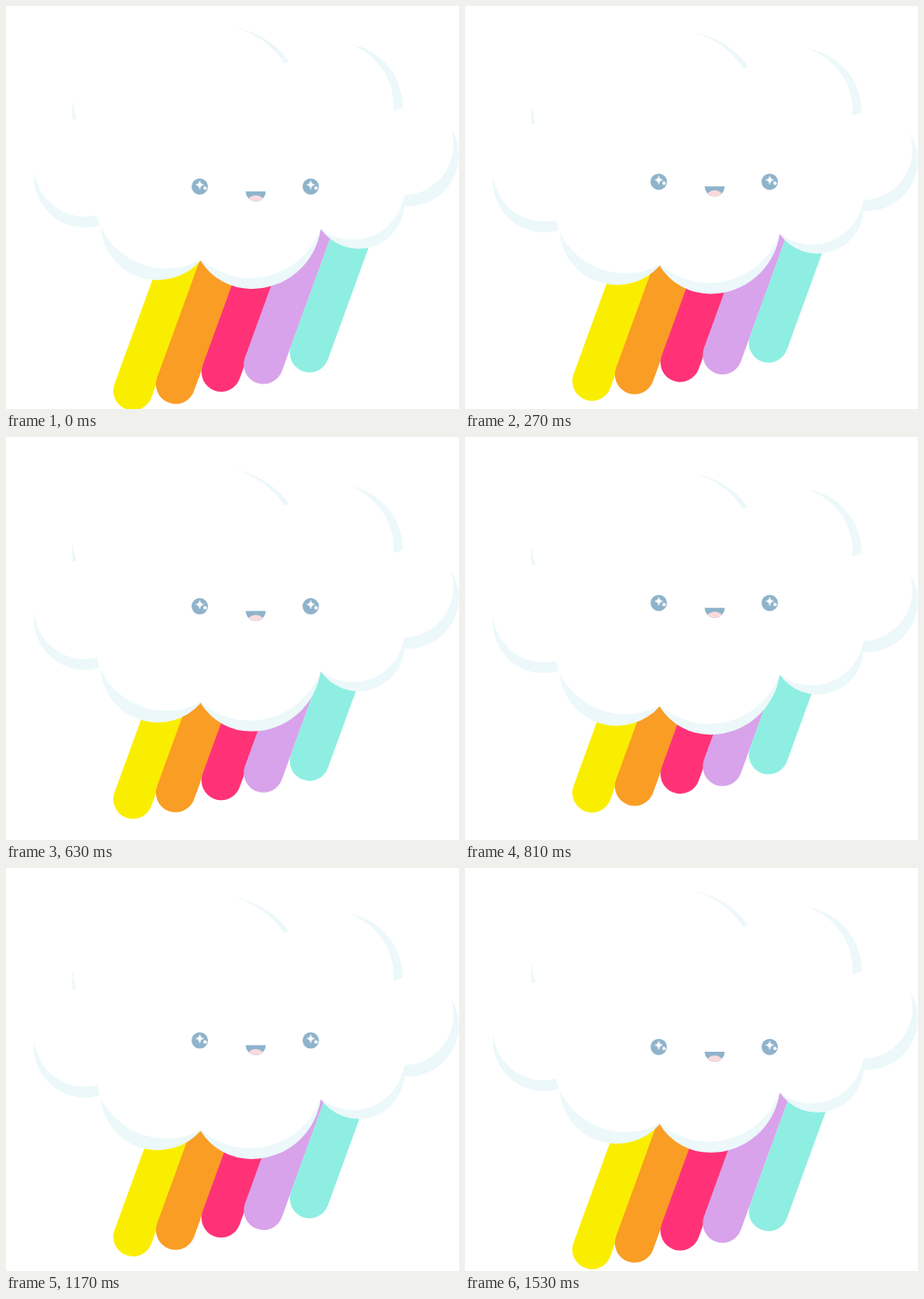
Write an HTML page that moves like this. It is 498x443 px and loops after 1620 ms.

```html
<!DOCTYPE html>
<html lang="en">
<head>
<meta charset="utf-8">
<title>Happy cloud</title>
<style>
  html, body { margin: 0; width: 100%; height: 100%; overflow: hidden; background: #fff; }
  svg { display: block; }
  #rainbow line { stroke-width: 43.2; stroke-linecap: round; }
</style>
</head>
<body>
<svg width="498" height="443" viewBox="0 0 498 443">
  <defs>
    <g id="eye">
      <circle r="9" fill="#8fb3cb"/>
      <path d="M0-6.5Q.6-2.6 4.5-2Q.6-1.4 0 3Q-.6-1.4-4.5-2Q-.6-2.6 0-6.5Z" fill="#fff" stroke="#fff" stroke-width=".4"/>
      <circle cx="5.8" cy="1.6" r="1.9" fill="#fff"/>
    </g>
  </defs>

  <g id="rainbow"></g>

  <g id="cloud">
    <path fill="#fff" d="M104 243L214 280L346 245L438 219V100H104Z"/>
    <g fill="#ecf8fa">
      <!-- underside, left to right: full bumps, then their white insides -->
      <path d="M31 181A56 56 0 0 0 103 241L100 230A56 56 0 0 1 31 181Z"/>
      <path d="M104 243A63 63 0 0 0 214 280Z"/>
      <path d="M214 280A65 65 0 0 0 270 311A77 77 0 0 0 346 245Z"/>
      <path d="M346 245A50.5 50.5 0 0 0 438 219V208Z"/>
      <path d="M438 220A56 56 0 0 0 489 134A56 56 0 0 1 438 208Z"/>
      <!-- top edges -->
      <path d="M377 41.5A70 70 0 0 1 436 112L426 115A72 72 0 0 0 377 41.5Z"/>
      <path d="M251 23.5A91 91 0 0 1 311 61L306 63A95 95 0 0 0 251 23.5Z"/>
      <path d="M73.5 104Q71.5 115 73.5 125L77.5 124Q74.5 115 73.5 104Z"/>
    </g>
    <path fill="#fff" d="M104 243A80 80 0 0 0 214 279A83 83 0 0 0 346 245A57.6 57.6 0 0 0 438 208V200H104Z"/>
  </g>

  <g id="face">
    <use href="#eye" x="213" y="198.5"/>
    <use href="#eye" x="335" y="198.5"/>
    <path fill="#8fb3cb" d="M263.5 203.7H285.5A11 11 0 0 1 263.5 203.7Z"/>
    <path fill="#fadadd" d="M266.5 211.3Q274.5 204.5 282.5 211.3A11 11 0 0 1 266.5 211.3Z"/>
  </g>
</svg>
<script>
const LOOP = 1620, STEP = 90;
const SLANT = Math.tan(20 * Math.PI / 180);
const BAR_RISE = 165;
const $ = id => document.getElementById(id);

// colour, then centre of the rounded lower end
const bars = [
  ['#faee00', 139.6, 423],
  ['#f99d25', 186.4, 415.8],
  ['#ff3278', 236.5, 402.4],
  ['#d8a3ea', 283, 394],
  ['#8eeee2', 333.6, 381.1],
];
$('rainbow').innerHTML = bars.map(([color, x, y]) =>
  `<line x1="${x}" y1="${y}" x2="${x + BAR_RISE * SLANT}" y2="${y - BAR_RISE}" stroke="${color}"/>`
).join('');

const shift = (id, y) => $(id).setAttribute('transform', `translate(0 ${y.toFixed(2)})`);

function draw(now) {
  const step = Math.floor(now % LOOP / STEP);
  const swing = Math.min(step, LOOP / STEP - step);
  shift('cloud', 1.8 * swing);
  shift('face', -1.78 * swing);
  shift('rainbow', -3.54 * swing);
}

const start = performance.now();
function tick() {
  draw(performance.now() - start);
  requestAnimationFrame(tick);
}
tick();
</script>
</body>
</html>
```
